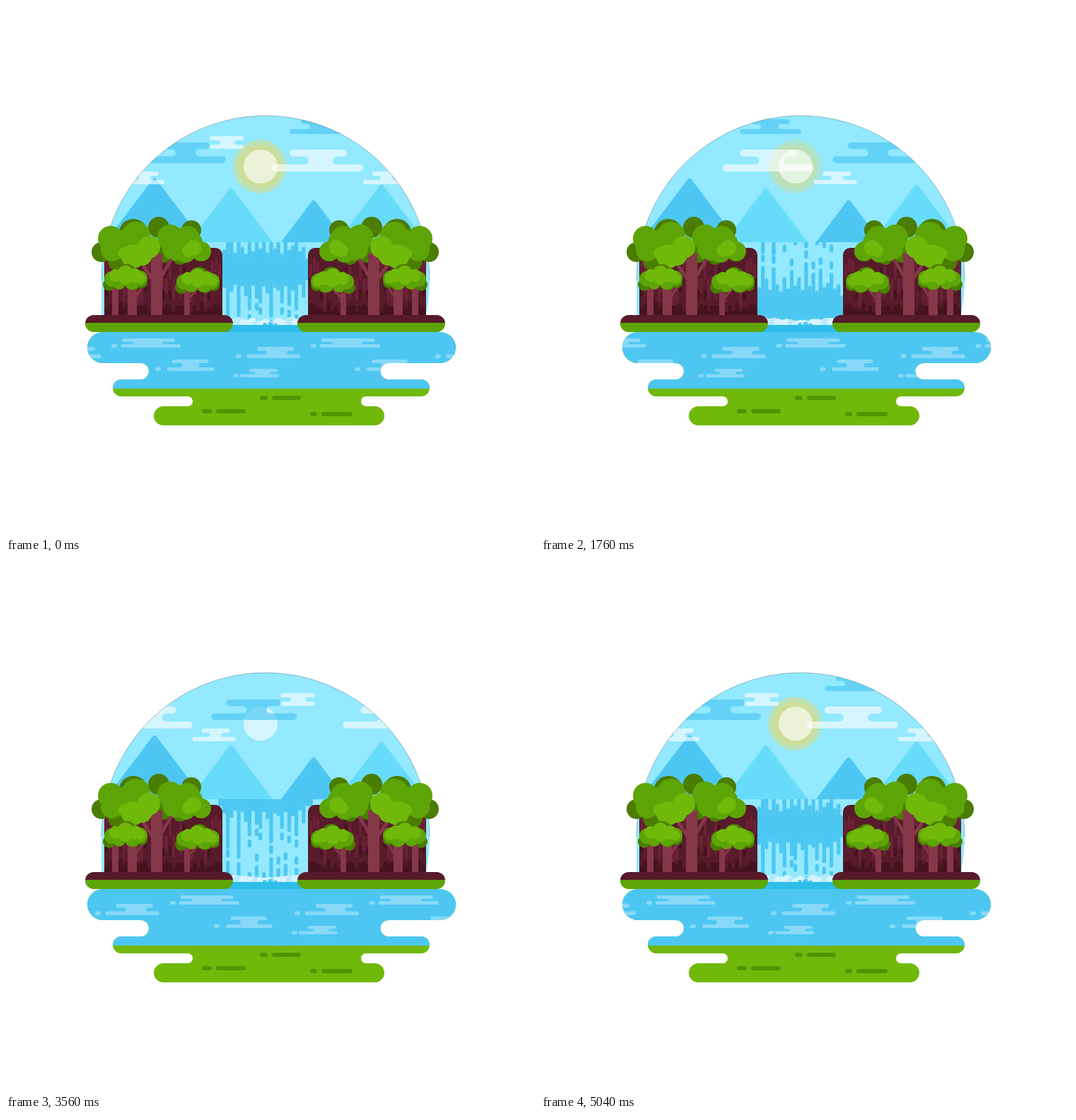
Animation of 748 by 748 pixels, one loop 5080 ms. Source, as an HTML page with a canvas:

```html
<!DOCTYPE html>
<html lang="en">
<head>
<meta charset="utf-8">
<title>Waterfall</title>
<style>
html, body { margin: 0; width: 100%; height: 100%; overflow: hidden; background: #fff; }
canvas { display: block; width: 748px; height: 748px; }
</style>
</head>
<body>
<canvas id="stage" width="748" height="748"></canvas>
<script>
const ctx = document.getElementById('stage').getContext('2d');
const LOOP = 5080, CYCLE = 5040, STEP = 40, MIRROR = 733;
const SKY = '#93e9ff', BLUE = '#4dc7f2', PALE = '#66dcfa';
const DARK = '#4b7c03', MID = '#5da506', BRIGHT = '#70b90a';
const BARK = '#853848', CLIFF = '#571b2b';
const UP = -Math.PI / 2, DOWN = Math.PI / 2;

function random(seed) {
  return () => (seed = (seed * 16807) % 2147483647) / 2147483647;
}

function bar(x0, x1, y0, y1, color, r = (y1 - y0) / 2) {
  ctx.fillStyle = color;
  ctx.beginPath();
  ctx.roundRect(x0, y0, x1 - x0, y1 - y0, r);
  ctx.fill();
}

function discs(color, ...list) {
  ctx.fillStyle = color;
  for (const [x, y, r] of list) {
    ctx.beginPath();
    ctx.arc(x, y, r, 0, Math.PI * 2);
    ctx.fill();
  }
}

function strand(x, y0, y1, width, color) {
  ctx.strokeStyle = color;
  ctx.lineWidth = width;
  ctx.lineCap = 'round';
  ctx.beginPath();
  ctx.moveTo(x, y0);
  ctx.lineTo(x, y1);
  ctx.stroke();
}

function clipped(path, draw) {
  ctx.save();
  ctx.beginPath();
  path();
  ctx.clip();
  draw();
  ctx.restore();
}

// Two rounded bars joined by a neck with concave sides.
function wisp(dx, { y, h, gap, top, neck, base, dot }, color) {
  const r = gap / 2, a = y + h, [n0, n1] = neck;
  ctx.fillStyle = color;
  ctx.beginPath();
  ctx.roundRect(top[0] + dx, y, top[1] - top[0], h, h / 2);
  ctx.roundRect(base[0] + dx, a + gap, base[1] - base[0], h, h / 2);
  if (dot) ctx.roundRect(dot + dx, a + gap, 8, h, h / 2);
  ctx.moveTo(n0 - r + dx, a);
  ctx.lineTo(n1 + r + dx, a);
  ctx.arc(n1 + r + dx, a + r, r, UP, DOWN, true);
  ctx.lineTo(n0 - r + dx, a + gap);
  ctx.arc(n0 - r + dx, a + r, r, DOWN, UP, true);
  ctx.fill();
}

function drift(items, span, t) {
  for (const item of items)
    for (let k = -1; k < 3; k++)
      wisp(k * span - span * t / CYCLE, item, item.color);
}

const WHITE_CLOUD = 'rgba(255,255,255,.62)', BLUE_CLOUD = 'rgba(77,199,242,.68)';
const clouds = [
  { y: 160, h: 7, gap: 7, top: [417, 471], neck: [430, 455], base: [401, 487], color: BLUE_CLOUD },
  { y: 193, h: 9.5, gap: 10, top: [211, 288], neck: [240, 268], base: [190, 311], color: BLUE_CLOUD },
  { y: 184, h: 6, gap: 6, top: [288, 336], neck: [303, 323], base: [288, 336], color: WHITE_CLOUD },
  { y: 203, h: 10, gap: 11, top: [401, 482], neck: [428, 462], base: [376, 505], color: WHITE_CLOUD },
  { y: 234, h: 6, gap: 6, top: [518, 558], neck: [530, 546], base: [505, 566], color: WHITE_CLOUD }
];
const RIPPLE = '#87d9f7';
const ripples = [
  { y: 470, h: 5, gap: 3, top: [164, 239], neck: [180, 222], base: [162, 247], dot: 149, color: RIPPLE },
  { y: 482, h: 5.5, gap: 5, top: [355, 407], neck: [369, 397], base: [340, 416], dot: 325, color: RIPPLE },
  { y: 500, h: 5, gap: 6, top: [235, 286], neck: [249, 273], base: [228, 294], dot: 211, color: RIPPLE },
  { y: 513, h: 4.5, gap: 3, top: [344, 384], neck: [352, 373], base: [331, 386], dot: 321, color: RIPPLE }
];

// Halo strength: [time, value] with straight lines between.
const glow = [[0, 1], [950, 0], [2120, .95], [3520, 0], [5040, 1], [5080, 1]];
function glowAt(t) {
  const i = glow.findIndex(([time]) => time > t);
  const [t0, a] = glow[i - 1], [t1, b] = glow[i];
  return a + (b - a) * (t - t0) / (t1 - t0);
}

function mountain(x, y, color) {
  const half = (334 - y) * .77;
  ctx.fillStyle = color;
  ctx.beginPath();
  ctx.moveTo(x - half, 334);
  ctx.lineTo(x - 4, y + 4);
  ctx.quadraticCurveTo(x, y - 3, x + 4, y + 4);
  ctx.lineTo(x + half, 334);
  ctx.fill();
}

function dome() {
  ctx.arc(367, 387, 232, 2.75, Math.PI * 2 + .4);
  ctx.lineTo(600, 461);
  ctx.lineTo(135, 461);
  ctx.lineTo(135, 387);
}

function drawSky(t) {
  ctx.fillStyle = SKY;
  ctx.fillRect(130, 150, 480, 320);
  ctx.globalAlpha = glowAt(t);
  discs('rgba(240,215,90,.42)', [359, 227, 38]);
  discs('rgba(240,215,90,.34)', [359, 227, 31]);
  ctx.globalAlpha = 1;
  discs('rgba(255,255,255,.62)', [360, 227, 24]);
  mountain(210, 243, BLUE);
  mountain(318, 257, PALE);
  mountain(435, 274, BLUE);
  mountain(531, 252, PALE);
  drift(clouds, 342, t);
}

const lead = [8, 42, 14, 4, 45, 6, 20, 40, 5, 24, 30, 6, 16, 48, 8, 12, 30, 6, 34, 12, 40, 4, 22];
const trail = [10, 40, 22, 6, 38, 14, 4, 24, 8, 34, 12, 24, 6, 45, 12, 30, 5, 36, 10, 16, 30, 8, 14];
const steady = [1, 4, 13];

function drawFall(t) {
  const period = 151, w = 5.2;
  ctx.fillStyle = SKY;
  ctx.fillRect(300, 334, 134, 120);
  for (const shift of [-period, 0, period]) {
    const top = 357 + shift + period * t / CYCLE, bottom = top + 31;
    ctx.fillStyle = BLUE;
    ctx.fillRect(300, top, 134, bottom - top);
    lead.forEach((down, i) => {
      const x = 308.6 + i * 5.1, tip = bottom + down, tail = top - trail[i];
      strand(x, tail, tip, w, BLUE);
      if (down > 22) strand(x, tip + 10, tip + 16, w, BLUE);
      if (trail[i] > 28) strand(x, tail - 16, tail - 10, w, BLUE);
      if (steady.includes(i)) strand(x, tail - 34, tail - 25, w, BLUE);
    });
  }
}

function drawFoam(t) {
  for (let i = 0; i < 17; i++) {
    const bob = Math.sin(t / CYCLE * Math.PI * 16 + i * 2.1);
    const edge = Math.abs(i - 8) / 8;
    discs(i % 4 === 2 ? '#b5eafc' : '#d6f4fd', [317 + i * 6.2, 450 - edge * 2 + bob * 1.3, 4.5 + edge * 2 + i % 3]);
  }
  discs(BLUE, [366, 451, 3], [374, 450, 3.5], [381, 451, 2.5]);
  ctx.fillStyle = '#2fbde9';
  ctx.fillRect(306, 451, 121, 11);
}

function drawCliff() {
  ctx.fillStyle = CLIFF;
  ctx.beginPath();
  ctx.roundRect(139, 342, 167, 100, [0, 10, 0, 0]);
  ctx.fill();
  const next = random(71);
  clipped(() => ctx.rect(139, 350, 167, 90), () => {
    for (let x = 142; x < 306; x += 5) {
      const y = 358 + next() * 30;
      strand(x, y, y + 15 + next() * 35, 4, '#6c2136');
      strand(x, 420 + next() * 15, 442, 5, '#45131f');
      if (next() > .4) {
        const d = 362 + next() * 45;
        strand(x, d, d + 4 + next() * 10, 4, '#45131f');
      }
    }
  });
}

function trunk(x0, x1, y) {
  ctx.fillStyle = BARK;
  ctx.fillRect(x0, y, x1 - x0, 441 - y);
}

function branch(x0, y0, x1, y1, width) {
  ctx.strokeStyle = BARK;
  ctx.lineWidth = width;
  ctx.beginPath();
  ctx.moveTo(x0, y0);
  ctx.lineTo(x1, y1);
  ctx.stroke();
}

function smallTree(x, y) {
  discs(DARK, [x - 23, y + 11, 9], [x - 10, y + 8, 9], [x + 11, y + 9, 10], [x + 23, y + 8, 8], [x + 2, y - 4, 14]);
  discs(MID, [x - 19, y + 3, 11], [x - 9, y + 9, 9], [x + 9, y + 7, 11], [x + 20, y + 2, 11]);
  discs(BRIGHT, [x - 14, y - 2, 9], [x, y - 5, 11], [x + 13, y - 2, 10], [x + 21, y + 2, 7], [x, y + 2, 9]);
}

function drawBank() {
  drawCliff();
  discs(DARK, [146, 327, 15], [135, 348, 14], [180, 321, 20], [216, 313, 15], [262, 317, 14],
    [160, 360, 16], [222, 349, 14], [246, 356, 10]);
  discs(MID, [148, 329, 18], [150, 345, 16], [184, 325, 20], [172, 335, 20], [232, 327, 18],
    [256, 329, 18], [238, 343, 17], [266, 334, 12], [254, 349, 14], [276, 347, 14]);
  branch(215, 390, 234, 358, 5);
  branch(211, 392, 192, 364, 5);
  trunk(205, 221, 350);
  trunk(172, 185, 395);
  discs(BRIGHT, [202, 341, 16], [180, 354, 17], [193, 354, 13], [168, 350, 9], [265, 342, 11], [258, 346, 9]);
  trunk(150, 159, 395);
  trunk(252, 260, 398);
  branch(185, 410, 192, 398, 3);
  branch(260, 412, 271, 400, 3);
  smallTree(169, 383);
  smallTree(271, 387);
  clipped(() => ctx.roundRect(112, 437, 209, 24, 12), () => {
    ctx.fillStyle = CLIFF;
    ctx.fillRect(112, 437, 209, 11);
    ctx.fillStyle = '#5da506';
    ctx.fillRect(112, 448, 209, 13);
  });
}

function shore() {
  const cap = (x, y, r) => ctx.arc(x, y, r, UP, DOWN);
  const capLeft = (x, y, r) => ctx.arc(x, y, r, DOWN, UP + Math.PI * 2);
  const bite = (x, y, r) => ctx.arc(x, y, r, UP, DOWN, true);
  const biteLeft = (x, y, r) => ctx.arc(x, y, r, DOWN, UP, true);
  cap(614, 483, 22);
  bite(541, 516.5, 11.5);
  cap(587, 540, 12);
  bite(509, 559, 7);
  cap(521.5, 579.5, 13.5);
  capLeft(222.5, 579.5, 13.5);
  biteLeft(257, 559, 7);
  capLeft(163, 540, 12);
  biteLeft(190.5, 516.5, 11.5);
  capLeft(137, 483, 22);
  ctx.closePath();
}

function drawShore(t) {
  ctx.fillStyle = BRIGHT;
  ctx.fillRect(110, 461, 530, 135);
  ctx.fillStyle = BLUE;
  ctx.fillRect(110, 461, 530, 80);
  drift(ripples, 282, t);
  for (const [x, y, w] of [[359, 551, 11], [376, 551, 41], [277, 570, 14], [297, 570, 42], [430, 574, 10], [446, 574, 44]])
    bar(x, x + w, y, y + 6, '#529400');
}

function draw(t) {
  ctx.fillStyle = '#fff';
  ctx.fillRect(0, 0, 748, 748);
  clipped(dome, () => drawSky(t));
  ctx.strokeStyle = 'rgba(50,60,80,.4)';
  ctx.lineWidth = .8;
  ctx.beginPath();
  ctx.arc(367, 387, 232, Math.PI, Math.PI * 2);
  ctx.stroke();
  clipped(() => ctx.rect(300, 334, 134, 118), () => drawFall(t));
  drawFoam(t);
  clipped(shore, () => drawShore(t));
  drawBank();
  ctx.save();
  ctx.translate(MIRROR, 0);
  ctx.scale(-1, 1);
  drawBank();
  ctx.restore();
}

const start = performance.now();
function tick() {
  const t = (performance.now() - start) % LOOP;
  draw(Math.floor(t / STEP) * STEP);
  requestAnimationFrame(tick);
}
tick();
</script>
</body>
</html>
```
